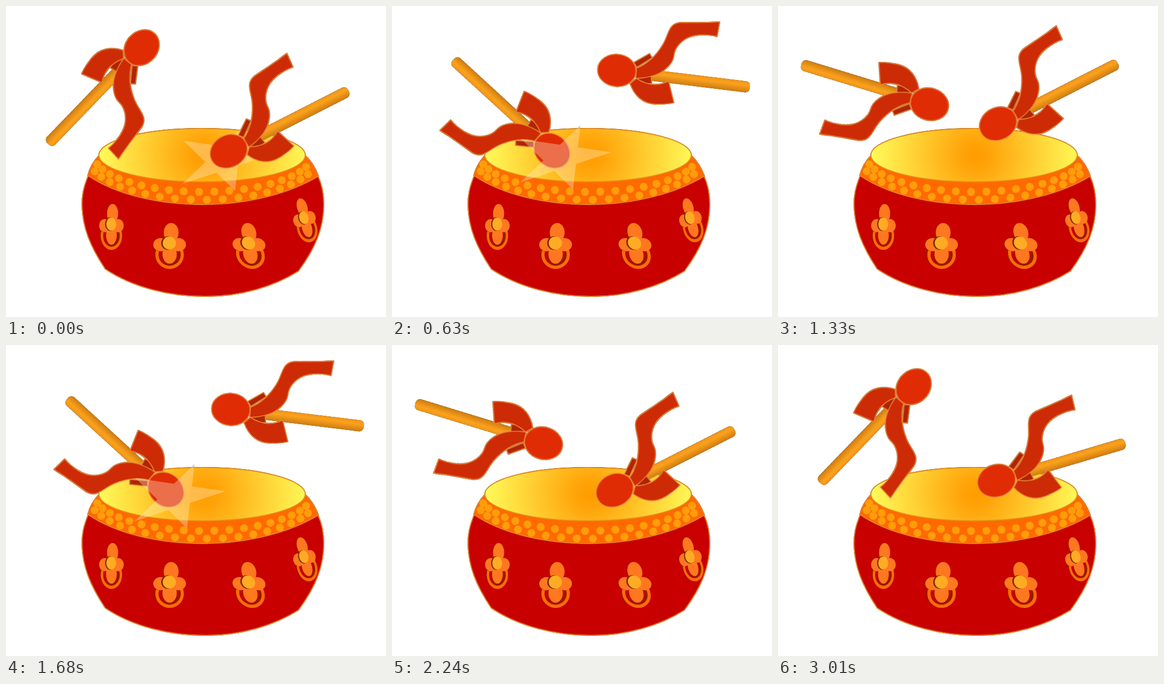
These frames come from a looping animation (720 by 589 pixels, 3150 ms). An HTML page:

```html
<!DOCTYPE html>
<html lang="en">
<head>
<meta charset="utf-8">
<title>Drum</title>
<style>
  html, body { margin: 0; width: 100%; height: 100%; overflow: hidden; background: #fff; }
  svg { display: block; width: 720px; height: 589px; }
  .scene { filter: drop-shadow(0 0 .6px #3a1a00); }

  .left, .right, .star { animation: 1050ms step-end infinite; }
  .left { animation-name: left; }
  .right { animation-name: right; }
  .star { fill: #fff0d2; fill-opacity: .34; }
  .star.a { animation-name: hit-right; }
  .star.b { animation-name: hit-left; }

  @keyframes left {
    0%     { transform: translate(257px, 79px) rotate(127deg); }
    13.33% { transform: translate(287px, 186px) rotate(190deg); }
    33.33% { transform: translate(315px, 259px) rotate(204.5deg); }
    53.33% { transform: translate(303px, 274px) rotate(215.5deg); }
    73.33% { transform: translate(300px, 224px) rotate(215.5deg); }
    86.66%, 100% { transform: translate(257px, 79px) rotate(127deg); }
  }
  @keyframes right {
    0%     { transform: translate(422px, 275px) rotate(-34deg); }
    20%    { transform: translate(417px, 223px) rotate(-34deg); }
    33.33% { transform: translate(404px, 162px); }
    53.33% { transform: translate(426px, 122px); }
    66.66% { transform: translate(411px, 156px) rotate(-12deg); }
    86.66%, 100% { transform: translate(414px, 257px) rotate(-23.5deg); }
  }
  @keyframes hit-right { 0% { opacity: 1; } 13.33%, 100% { opacity: 0; } }
  @keyframes hit-left { 0% { opacity: 0; } 53.33% { opacity: 1; } 66.66%, 100% { opacity: 0; } }
</style>
</head>
<body>
<svg viewBox="0 0 720 589">
  <defs>
    <radialGradient id="skin" gradientUnits="userSpaceOnUse" cx="375" cy="283" r="197">
      <stop offset="0" stop-color="#ff9c00"/>
      <stop offset=".12" stop-color="#ffa208"/>
      <stop offset="1" stop-color="#fffa5a"/>
    </radialGradient>
    <linearGradient id="wood" x1="0" y1="0" x2="0" y2="1">
      <stop offset="0" stop-color="#f09418"/>
      <stop offset=".35" stop-color="#fba21c"/>
      <stop offset="1" stop-color="#cf7c12"/>
    </linearGradient>

    <!-- Beater, centred on its head -->
    <g id="beater" stroke="#e8873a" stroke-width="1.8" stroke-linejoin="round">
      <rect x="50" y="-9.5" width="204" height="21" rx="8" transform="rotate(7)" fill="url(#wood)" stroke="none"/>
      <path fill="#b02404" d="M32-15 62-32 67-24 38-6ZM36 14 65 11 66 25 44 26Z"/>
      <g fill="#cd2b05">
        <path d="M25 25C32 45 48 66 80 64Q97 64 108 61L98 20C84 28 61 31 37 15Z"/>
        <path d="M37-4C60-13 76-31 86-47C95-61 96-73 103-82S119-91 130-91Q162-90 195-92L190-64C165-70 145-67 133-61S109-42 108-27C106-12 88 4 72 9Q54 15 36 15Z"/>
      </g>
      <ellipse rx="36.5" ry="30.5" transform="rotate(5)" fill="#e02c04"/>
    </g>

    <!-- Ring handle, centred on its boss -->
    <g id="handle">
      <g fill="none">
        <circle cx="-1" cy="21" r="23" stroke="#8c2000" stroke-width="8"/>
        <circle cx="1" cy="22" r="24" stroke="#ff6a08" stroke-width="6"/>
      </g>
      <g id="petals" fill="#8c2a00">
        <ellipse cx="3" cy="-20" rx="14" ry="18"/>
        <ellipse cx="-17" cy="3" rx="14" ry="12.5"/>
        <ellipse cx="17" cy="3" rx="14" ry="12.5"/>
        <ellipse cy="21" rx="13.5" ry="18"/>
      </g>
      <g fill="#ff7820">
        <ellipse cx="4" cy="-20" rx="14" ry="18"/>
        <ellipse cx="-16" cy="3" rx="14" ry="12.5"/>
        <ellipse cx="18" cy="3" rx="14" ry="12.5"/>
        <ellipse cx="1" cy="21" rx="13.5" ry="18"/>
      </g>
      <circle cx="-2" r="13" fill="#7c2c00"/>
      <circle cx=".5" r="12.5" fill="#ffab24"/>
    </g>

    <polygon id="star" points="245,252 416,277 243,334 357,226 343,347"/>
  </defs>

  <g class="scene">
    <g stroke="#e5862b" stroke-width="1.8" stroke-linejoin="round">
      <path fill="#c80000" d="M156 321C146 345 144 360 144 377C145 420 160 456 188 498C240 533 310 550 378 550S508 531 554 502C586 459 602 420 602 376Q602 345 591 322Z"/>
      <path fill="#ff6a00" d="M176 283Q160 300 155 321C210 358 290 376 375 376S540 354 592 322Q583 298 567 283Z"/>
    </g>
    <g id="studs" fill="#ff9d0a"></g>
    <ellipse cx="371.5" cy="282.5" rx="195.5" ry="50.5" fill="url(#skin)" stroke="#e5901c" stroke-width="1.8"/>

    <use href="#handle" transform="translate(199 413) scale(.75 1)"/>
    <use href="#handle" transform="translate(309 449)"/>
    <use href="#handle" transform="translate(459 449) skewX(8)"/>
    <use href="#handle" transform="translate(564 401) rotate(-16) scale(.7 .98)"/>

    <g class="star a"><use href="#star" x="91" y="3"/></g>
    <g class="left"><use href="#beater"/></g>
    <g class="right"><use href="#beater"/></g>
    <g class="star b"><use href="#star"/></g>
  </g>
</svg>
<script>
  // Two staggered rows of studs, each on its own arc around the rim
  let studs = '';
  for (let i = -18; i <= 18; i++) {
    const a = (i - .5) * Math.PI / 45;
    const [rx, ry, top] = i % 2 ? [218, 82, 285] : [208, 72, 280];
    studs += `<circle cx="${373 + rx * Math.sin(a)}" cy="${top + ry * Math.cos(a)}" r="7.5"/>`;
  }
  document.getElementById('studs').innerHTML = studs;
</script>
</body>
</html>
```
